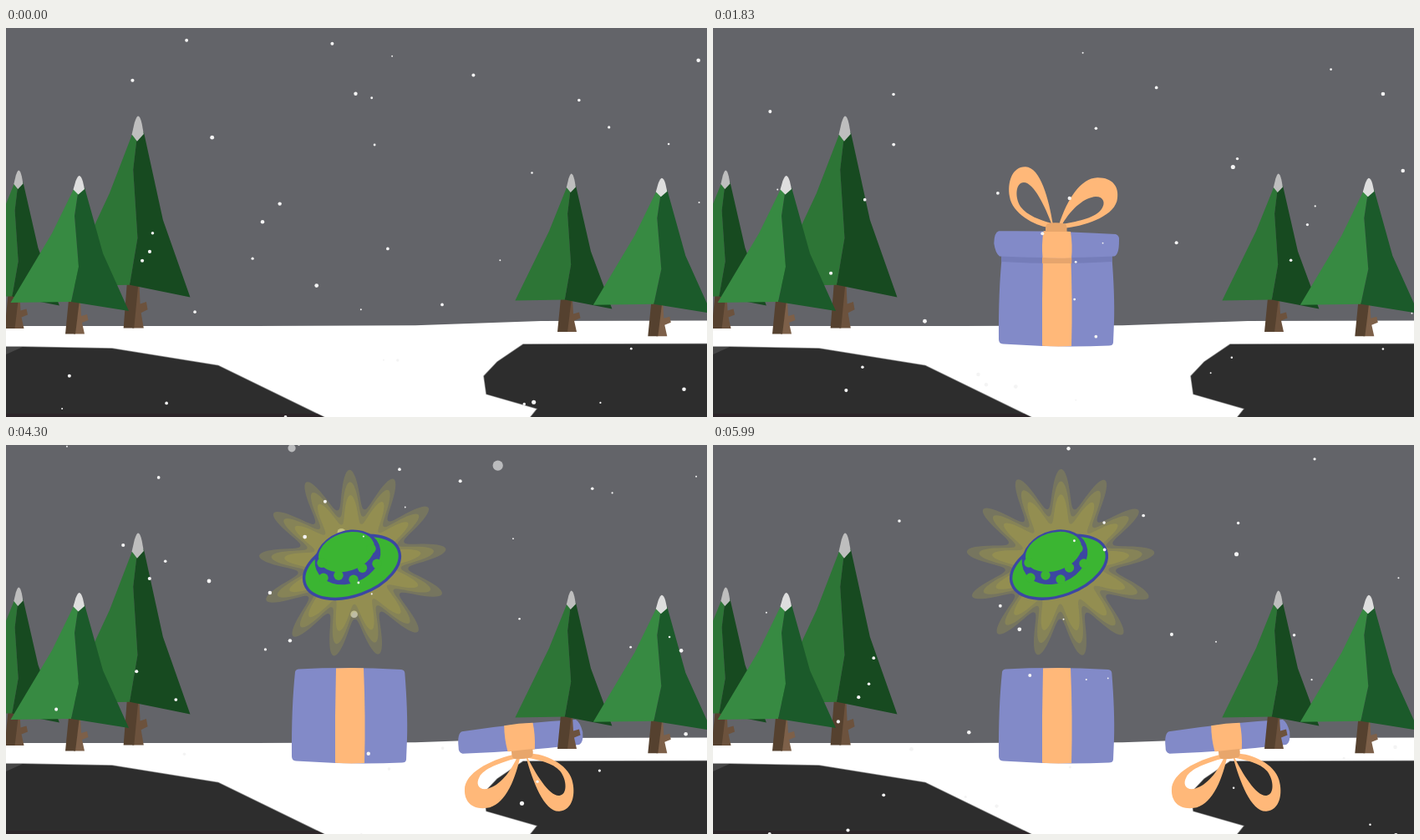
These frames come from a looping animation (839 px wide and 466 px high, 6.09 s). An HTML page with a canvas:

```html
<!DOCTYPE html>
<html lang="en">
<head>
<meta charset="utf-8">
<title>Winter gift</title>
<style>
html, body { margin: 0; width: 100%; height: 100%; overflow: hidden; background: #636469; }
canvas { display: block; width: 839px; height: 466px; }
</style>
</head>
<body>
<canvas id="stage" width="839" height="466"></canvas>
<script>
const W = 839, H = 466, LOOP = 6090, HOLD = 390, STEP = 58.33;
const DROP = 540, LAND = 1030, LIFT = 3280, OPEN = 3340;
const ctx = document.getElementById('stage').getContext('2d');
const rad = Math.PI / 180;

let seed = 77;
function rnd() {
  seed = (seed * 1664525 + 1013904223) >>> 0;
  return seed / 4294967296;
}

// Damped rise from 0 past 1 and back
function spring(ms) {
  const u = ms / 1000;
  return 1 - Math.exp(-9.5 * u) * Math.cos(9 * u);
}

function fill(color, path, rule) {
  ctx.fillStyle = color;
  ctx.fill(path, rule || 'nonzero');
}
function oval(x, y, a, b, deg, color, line) {
  ctx.beginPath();
  ctx.ellipse(x, y, a, b, deg * rad, 0, 7);
  ctx.fillStyle = color;
  ctx.fill();
  if (line) {
    ctx.strokeStyle = line;
    ctx.lineWidth = 3.4;
    ctx.stroke();
  }
}
function circle(x, y, r, color) {
  oval(x, y, r, r, 0, color);
}
function placed(draw) {
  ctx.save();
  draw();
  ctx.restore();
}

// Landscape
const land = {
  snow: new Path2D('M-40 357 H300 L490 356.3 L640 351 L900 350.5 V520 H-40Z'),
  left: new Path2D('M-40 382 H20 L127 384 L254 404.5 L380 466 L430 490 H-40Z'),
  corner: new Path2D('M-20 382 H20 L-20 400Z'),
  strip: new Path2D('M-40 462 H372 L430 490 H-40Z'),
  right: new Path2D('M619 379 L900 378.5 V500 H600 L628 466 L636 456 L575 438.5 L572 417 L588 400Z')
};
function drawLand() {
  fill('#fff', land.snow);
  ctx.lineWidth = 1.5;
  ctx.strokeStyle = 'rgba(70,70,70,.6)';
  for (const rock of [land.left, land.right]) {
    ctx.stroke(rock);
    fill('#2d2d2d', rock);
  }
  fill('#474747', land.corner);
  fill('#2c2528', land.strip);
}

// Pines, drawn around the peak
const pine = {
  left: new Path2D('M-7 16 L-33 69 L-82.5 152 L-10 151 L-1 109 L-6 48 L-2 21Z'),
  right: new Path2D('M6 14 L28 93 L59 162 L-10 151 L-1 109 L-6 48 L-2 21Z'),
  cap: new Path2D('M-.5 0 Q2 0 4 7 L6 16 L-1.5 22.5 L-7.5 16.5 L-4.5 6 Q-2 0 -.5 0Z'),
  bark: new Path2D('M-13 149 H0 L-5 189.5 H-17Z'),
  wood: new Path2D('M-3 149 L1 151 L2 168 L9 166 L10.5 173 L3 176 L6 189.5 H-7Z')
};
const dim = { left: '#2d7536', right: '#174a20', cap: '#bebebe', wood: '#6c523d' };
const lit = { left: '#378a42', right: '#1b5a2a', cap: '#dedede', wood: '#7d6049' };
function drawPine(x, y, sx, sy, tone) {
  placed(() => {
    ctx.translate(x, y);
    placed(() => {
      ctx.scale(Math.max(1, sx), sy);
      fill(tone.wood, pine.wood);
      fill('#55412f', pine.bark);
    });
    ctx.scale(sx, sy);
    for (const part of ['left', 'right', 'cap']) fill(tone[part], pine[part]);
  });
}
function drawPines() {
  drawPine(15.5, 170.5, .82, 1, dim);
  drawPine(158.5, 105.5, 1.05, 1.34, dim);
  drawPine(88, 177, 1, 1, lit);
  drawPine(677, 174.5, .82, 1, dim);
  drawPine(785.3, 179.8, 1, 1, lit);
}

// Gift
const blue = '#828ac8', peach = '#ffb879';
const gift = {
  body: new Path2D('M350 268.5 Q411 265.5 473 269 Q477 269.5 477.3 273 Q481 320 480 352 L479 377 Q478.5 380.5 474 380.5 Q411 383 347 378.5 Q342 378 342 373 Q341.5 315 346 272 Q346.3 269 350 268.5Z'),
  band: new Path2D('M395 267.5 Q411 266.5 428 267.3 Q430.5 325 429 381 Q411 382 394 380.7 Q393.5 325 395 267.5Z'),
  lid: new Path2D('M342 243.3 Q411 242.5 482 247 Q487 249 486 255 Q486 272 480 273.5 Q411 277 343 273.5 Q338 270 336.3 258 Q336.5 245 342 243.3Z'),
  lidBand: new Path2D('M395.5 243.3 Q411 242.5 428 244 Q430.5 260 429 275.3 Q411 276.5 394.5 275 Q393 260 395.5 243.3Z'),
  shade: new Path2D('M345 273 H478 L477.5 280 Q411 284 345 280Z'),
  bandShade: new Path2D('M394 275 H429.3 V282 H394Z'),
  knot: new Path2D('M401 234 Q411 232.5 421 234.5 Q424 235 423.5 244 H398 Q397.5 235 401 234Z'),
  leftLoop: new Path2D('M407 236 C402 205 392 167 374 166.3 C358 166 352 185 355 202 C358 222 385 237 402 239Z M405 234 C398 215 384 185 372 185 C362 185 361 203 368 214 C376 225 392 230 405 234Z'),
  rightLoop: new Path2D('M414 236 C424 205 440 180 460 179.3 C478 179 486 190 484 204 C482 224 450 236 423 239.5Z M418 235 C430 215 445 203 458 202 C468 202 470 210 465 217 C458 227 440 231 418 235Z')
};
function drawLid() {
  fill(blue, gift.lid);
  fill(peach, gift.lidBand);
  fill(peach, gift.leftLoop, 'evenodd');
  fill(peach, gift.rightLoop, 'evenodd');
  fill('#e8a66b', gift.knot);
}

// Pulses that grow until the lid goes
function squash(t) {
  if (t < 2350 || t >= LIFT) return 0;
  return .04 * ((t - 2350) / 1000) ** 2 * Math.cos((t - 3015) / 53);
}
function drawGift(t) {
  if (t < DROP) return;
  const p = Math.min(1, (t - DROP) / (LAND - DROP));
  const s = squash(t);
  placed(() => {
    ctx.translate(411, 381 - 400 * (1 - p * p));
    ctx.scale(1 + s, 1 - s);
    ctx.translate(-411, -381);
    fill(blue, gift.body);
    fill(peach, gift.band);
    if (t < LIFT) {
      fill('#757db9', gift.shade);
      fill('#e6a56d', gift.bandShade);
      drawLid();
    }
  });
  if (t >= LIFT) drawFlyingLid(t - LIFT);
}
function drawFlyingLid(ms) {
  const p = Math.min(1, ms / 340);
  const turn = 174 * (1 - Math.exp(-ms / 84));
  placed(() => {
    ctx.translate(411 + 204.5 * p, 262 + 85.5 * p - 520 * p * (1 - p));
    ctx.rotate(turn * rad);
    ctx.translate(-411, -262);
    drawLid();
  });
}

// Burst: offsets from the box reached after 317 ms
const burst = Array.from({ length: 27 }, () => ({
  x: (rnd() + rnd() - 1) * 150, y: 280 * rnd() ** 2 - 275, r: 3 + rnd() * 3.7
}));
function drawBurst(ms) {
  const k = ms / 317;
  const alpha = .56 * Math.max(0, Math.min(1, (5600 - OPEN - ms) / 500));
  for (const b of burst) {
    circle(411 + b.x * k, 275 + b.y * k, b.r, `rgba(255,255,255,${alpha})`);
  }
}

function rays(x, y, r, turn) {
  ctx.beginPath();
  for (let i = 0; i < 390; i++) {
    const a = i / 390 * 2 * Math.PI;
    const d = r * (.59 + .41 * (.5 + .5 * Math.cos(13 * a)) ** 1.2);
    const b = a + turn * rad - Math.PI / 2;
    ctx.lineTo(x + d * Math.cos(b), y + d * Math.sin(b));
  }
  ctx.fillStyle = 'rgba(202,190,56,.19)';
  ctx.fill();
}
function drawStar(ms, sway) {
  const s = spring(ms);
  const r = (112 - sway) * s;
  const y = 270 - 127 * s + 1.2 * sway;
  const turn = -3.4 + ms * .0014;
  for (const size of [1, .87, .73]) rays(414 - 2 * sway, y, r * size, turn);
}

const green = '#3bb532', navy = '#3c47a2';
const rivets = [[-34, 15], [-16, 12], [2, 17], [12.5, 3], [30, -2], [23, -20], [-36, -3]];
function drawSaucer(ms, sway) {
  const s = spring(ms);
  placed(() => {
    ctx.translate(414, 300 - 155.5 * s + .5 * sway);
    ctx.scale(Math.min(1, s), Math.min(1, s));
    oval(0, 2.2, 59.7, 34.1, -20, green, navy);
    oval(-5, -9.8, 40.5, 31.5, -22, navy);
    oval(-6.5, -16, 34.5, 22.8, -18, green);
    for (const [x, y] of rivets) circle(x, y, 5.7, green);
  });
}

const flakes = Array.from({ length: 38 }, () => ({
  x: rnd() * W, y: rnd() * 480, r: .9 + rnd() * 1.7, v: 55 + rnd() * 80, sway: rnd() * 6.28
}));
function drawFlakes(t) {
  for (const f of flakes) {
    const y = (f.y + f.v * t / 1000) % 480 - 6;
    circle(f.x + 8 * Math.sin(f.sway + t / 1300), y, f.r, '#f4f4f4');
  }
}

// Jolt of the whole scene when the gift lands
function jolt(t) {
  if (t < LAND || t > 1600) return 0;
  const u = t - 1148;
  return -12 * Math.exp(-u / 200) * Math.cos(u * Math.PI / STEP);
}

function render(ms) {
  const n = Math.floor((ms - HOLD) / STEP + .3);
  const t = ms < HOLD ? 0 : HOLD + n * STEP;
  ctx.fillStyle = '#636469';
  ctx.fillRect(0, 0, W, H);
  const dx = jolt(t);
  placed(() => {
    ctx.translate(dx, -dx * .2);
    drawLand();
    if (t > OPEN) {
      const age = t - OPEN, sway = Math.cos((t - 4998) * Math.PI / 992);
      drawBurst(age);
      drawStar(age, sway);
      drawSaucer(age, sway);
    }
    drawGift(t);
    drawPines();
  });
  drawFlakes(t);
}

const start = performance.now();
function frame() {
  render((performance.now() - start) % LOOP);
  requestAnimationFrame(frame);
}
frame();
</script>
</body>
</html>
```
